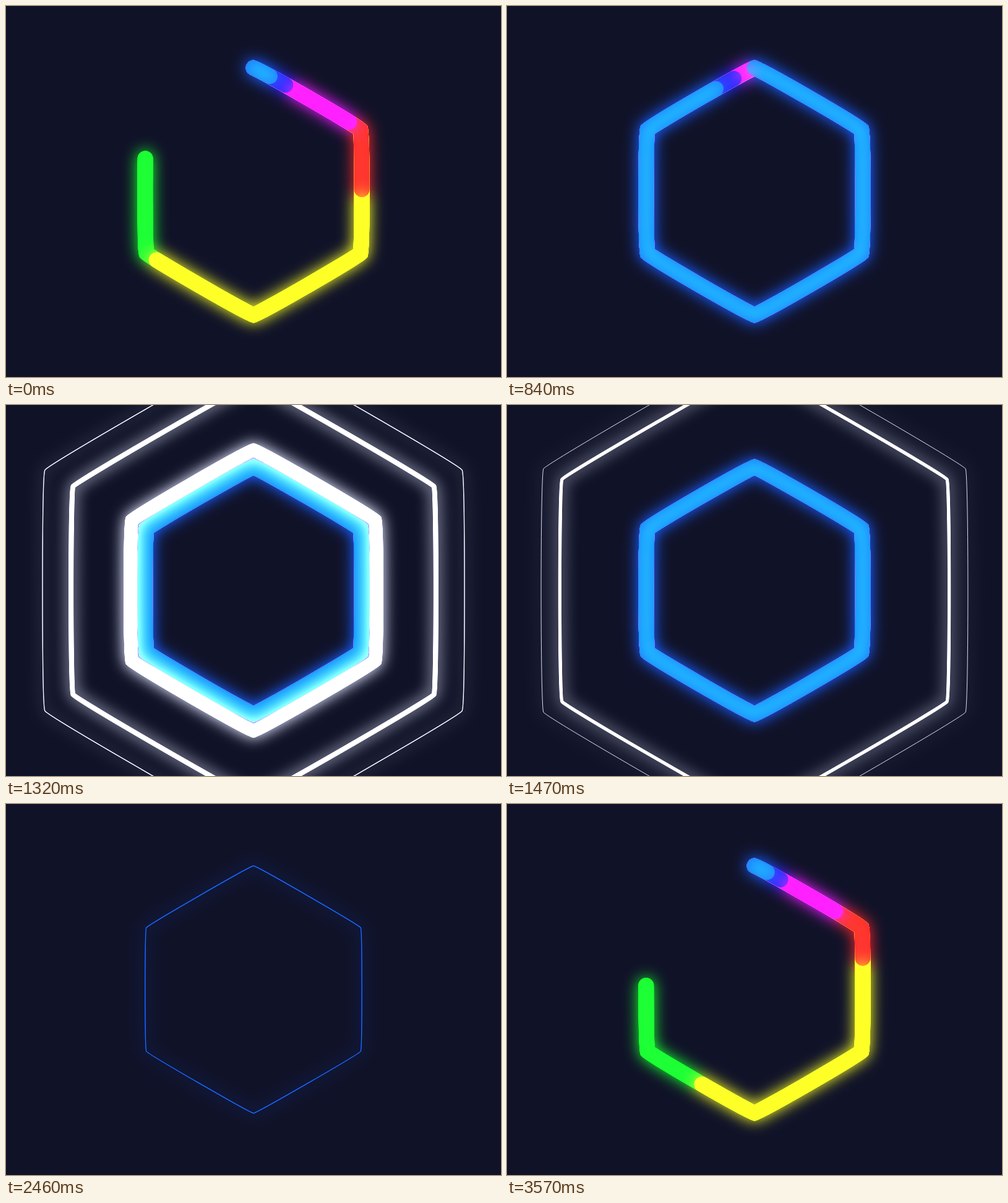
An HTML page with a canvas for the animation above (3.6 s loop, 800x600 px).

```html
<!DOCTYPE html>
<html lang="en">
<head>
<meta charset="utf-8">
<title>Neon hexagon</title>
<style>
  html, body { margin: 0; width: 100%; height: 100%; overflow: hidden; background: #101228; }
  canvas { display: block; }
</style>
</head>
<body>
<canvas id="stage" width="800" height="600"></canvas>
<script>
const LOOP = 3600;
const PHASE = 900;          // the cycle opens on an empty stage
const PAD = 80;             // keeps the glow intact at the stage borders
const RADIUS = 200;
const ROUNDNESS = 0.1;
const LENGTH = 1200.8;      // outline of the rounded hexagon
const WIDTH = 25;
const DRAW_TIME = 1500;
const RING = { start: 1770, gap: 120, time: 600, count: 3 };
const SHRINK = { start: 2910, time: 600 };

const strokes = [
  { color: '#08ff08', delay: 0 },
  { color: '#ffff00', delay: 90 },
  { color: '#ff1404', delay: 270 },
  { color: '#ff08ff', delay: 360 },
  { color: '#1010ff', delay: 540 },
  { color: '#085aff', delay: 630 }
];

const ctx = document.getElementById('stage').getContext('2d');
const layer = document.createElement('canvas');
layer.width = 800 + 2 * PAD;
layer.height = 600 + 2 * PAD;
const pen = layer.getContext('2d');

// Clockwise from the top; each corner has short handles along its tangent.
function makeHexagon() {
  const path = new Path2D();
  const handle = ROUNDNESS * 2 * Math.PI * RADIUS / 24;
  const corner = (i, offset) => {
    const a = (i * 60 - 90) * Math.PI / 180;
    return [RADIUS * Math.cos(a) - offset * Math.sin(a),
            RADIUS * Math.sin(a) + offset * Math.cos(a)];
  };
  path.moveTo(...corner(0, 0));
  for (let i = 0; i < 6; i++) {
    path.bezierCurveTo(...corner(i, handle), ...corner(i + 1, -handle), ...corner(i + 1, 0));
  }
  return path;
}
const openHexagon = makeHexagon();
const closedHexagon = makeHexagon();
closedHexagon.closePath();

// Symmetric cubic Bezier easing (.75, 0, .25, 1), solved by bisection.
function ease(x) {
  if (x <= 0) return 0;
  if (x >= 1) return 1;
  let lo = 0, hi = 1;
  for (let i = 0; i < 30; i++) {
    const s = (lo + hi) / 2, r = 1 - s;
    if (2.25 * r * r * s + 0.75 * r * s * s + s * s * s < x) lo = s;
    else hi = s;
  }
  return lo * lo * (3 - 2 * lo);
}

function drawRing(progress) {
  if (progress <= 0 || progress >= 1) return;
  const scale = 1 + progress;
  pen.save();
  pen.scale(scale, scale);
  pen.lineWidth = WIDTH * (1 - progress) / scale;
  pen.strokeStyle = '#fff';
  pen.stroke(closedHexagon);
  pen.restore();
}

function drawStroke(color, progress, width) {
  if (progress <= 0 || width <= 0) return;
  pen.save();
  pen.strokeStyle = color;
  pen.lineWidth = width;
  if (progress < 1) pen.setLineDash([progress * LENGTH, 2 * LENGTH]);
  pen.stroke(progress < 1 ? openHexagon : closedHexagon);
  pen.restore();
}

function drawScene(clock) {
  pen.setTransform(1, 0, 0, 1, 0, 0);
  pen.clearRect(0, 0, layer.width, layer.height);
  pen.translate(layer.width / 2, layer.height / 2);
  pen.lineCap = pen.lineJoin = 'round';

  for (let i = 0; i < RING.count; i++) {
    drawRing(ease((clock - RING.start - i * RING.gap) / RING.time));
  }
  const shrinking = clock >= SHRINK.start;
  const width = WIDTH * (1 - ease((clock - SHRINK.start) / SHRINK.time));
  for (const { color, delay } of shrinking ? strokes.slice(-1) : strokes) {
    drawStroke(color, ease((clock - delay) / DRAW_TIME), width);
  }
}

function render(time) {
  drawScene((time + PHASE) % LOOP);
  ctx.fillStyle = '#101228';
  ctx.fillRect(0, 0, 800, 600);
  ctx.save();
  ctx.globalCompositeOperation = 'lighter';
  ctx.drawImage(layer, -PAD, -PAD);
  ctx.filter = 'blur(12px)';
  ctx.drawImage(layer, -PAD, -PAD);
  ctx.restore();
}

const begin = performance.now();
function tick() {
  render(performance.now() - begin);
  requestAnimationFrame(tick);
}
tick();
</script>
</body>
</html>
```
